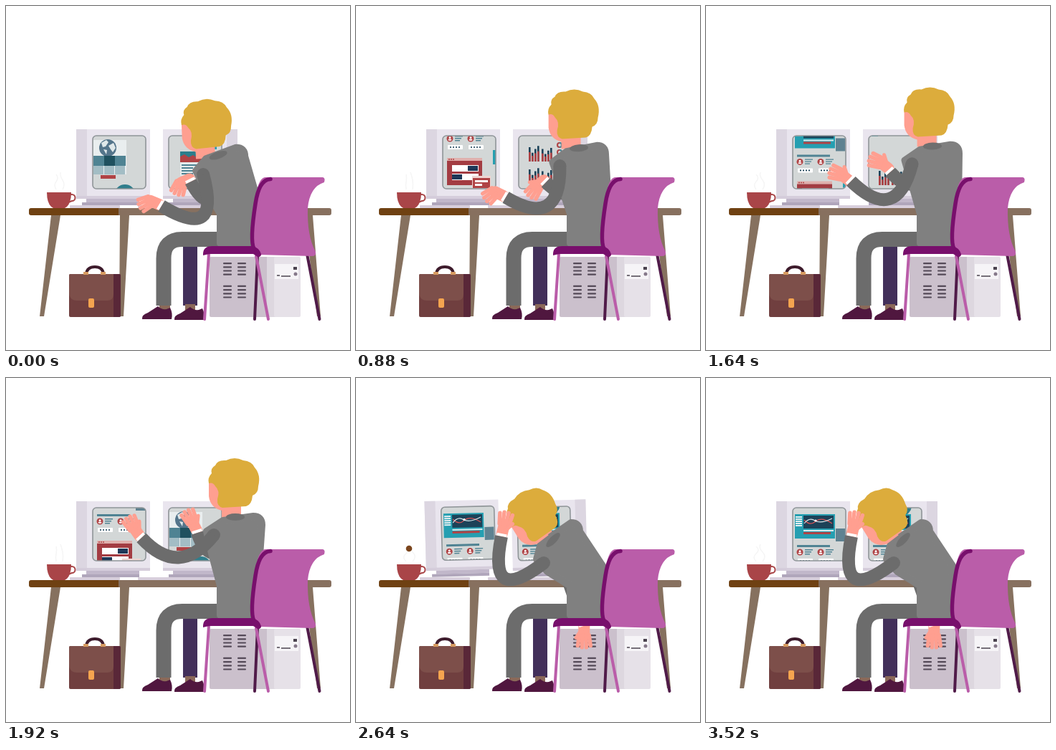
Recreate the animation shown at these times as an HTML page with a canvas. Size 480 by 480 pixels, loop 3560 ms.

```html
<!DOCTYPE html>
<html lang="en">
<head>
<meta charset="utf-8">
<title>Office worker</title>
<style>
html, body { margin: 0; width: 100%; height: 100%; overflow: hidden; background: #fff }
canvas { display: block; width: 480px; height: 480px }
</style>
</head>
<body>
<canvas id="stage" width="480" height="480"></canvas>
<script>
const g = document.getElementById('stage').getContext('2d');
const LOOP = 3560, STEP = 40, BEAT = 480, SLAM = 2160;
const GREY = '#808080', SLEEVE = '#6c6c6c', SKIN = '#ff9f90', HAIR = '#dcac3c';
const PINK = '#ba5da9', PLUM = '#780f6c', SHOE = '#50173f';
const RED = '#b04345', TEAL = '#259fb1', NAVY = '#1c4258', SLATE = '#4f8393';
const { PI, sin, cos, abs, max, min, floor, hypot, sqrt } = Math;

// Drawing helpers
function box(color, x, y, w, h, r = 0) {
  g.fillStyle = color;
  g.beginPath();
  g.roundRect(x, y, w, h, r);
  g.fill();
}
function dot(color, x, y, r) {
  g.fillStyle = color;
  g.beginPath();
  g.arc(x, y, r, 0, 2 * PI);
  g.fill();
}
function fill(color, path) {
  g.fillStyle = color;
  g.fill(new Path2D(path));
}
function line(color, width, path, cap = 'butt') {
  g.strokeStyle = color;
  g.lineWidth = width;
  g.lineCap = cap;
  g.lineJoin = 'round';
  g.stroke(new Path2D(path));
}
function group(draw, x = 0, y = 0, angle = 0) {
  g.save();
  g.translate(x, y);
  g.rotate(angle);
  draw();
  g.restore();
}
function repeat(n, draw) {
  for (let i = 0; i < n; i++) draw(i);
}

// One stop per beat: each is held, then eases into the next; the last one stays
function atBeat(stops, t) {
  const last = stops.length - 1, beat = min(last, t / BEAT + .1), i = floor(beat);
  const u = max(0, min(1, (beat - i - .27) / .46)), e = u * u * (3 - 2 * u);
  const mix = (a, b) => a + (b - a) * e;
  const from = stops[i], to = stops[min(last, i + 1)];
  return Array.isArray(from) ? from.map((v, n) => mix(v, to[n])) : mix(from, to);
}

// A pose is how far the body leans, then wrist x y, hand angle and finger bend per arm
const leaning = [.53, 217, 279, 3.54, -.85, 258, 245, 2.74, -.8];
const upright = [.2, 209, 267, 3.6, -1.15, 265, 246, 2.4, -.2];
const typing = [.2, 219, 271, 3.4, -.83, 245, 251, 3.29, -.76];
const raised = [0, 189, 223, 4.1, .09, 267, 216, 4.23, 0];
const despair = [1, 203, 221, 4.95, -.05, 317, 342, 1.57, 0];
const poses = [leaning, leaning, upright, typing, raised, despair];

// Screen sections, drawn in page coordinates
function person(x, y) {
  dot(RED, x, y, 4.5);
  dot('#fff', x, y - 1.2, 1.5);
  box('#fff', x - 2.3, y + .8, 4.6, 2, 1);
  repeat(3, i => box(SLATE, x + 7, y - 4 + i * 3, 11 - i * 2, 1.4));
}
function pill(x, y) {
  box('#fff', x, y, 21, 6, 1);
  repeat(4, i => dot(NAVY, x + 4 + i * 4, y + 3, 1.1));
}
function bars(x, y, n, height) {
  repeat(n, i => {
    const h = height * (.45 + .5 * abs(sin(i * 2.3 + 1)));
    box(NAVY, x + i * 4, y - h, 2.6, h);
    box(RED, x + i * 4, y - h * .65, 2.6, h * .65);
  });
}
function ring(x, y) {
  dot(RED, x, y, 4);
  fill(SLATE, `M${x} ${y}v-4a4 4 0 0 1 0 8z`);
  dot('#d3d7d7', x, y, 2);
  repeat(3, i => box(SLATE, x + 7, y - 3 + i * 3, 12, 1.2));
}
function globePage() {
  box('#e9eeef', 1, 6, 46, 48);
  dot('#54758b', 21, 17, 12);
  fill('#dfe8ea', 'M12 10l7-4 3 3-4 6-4 1zM22 14l7-4 3 7-4 6-3-4zM15 19l5 1-1 6z');
  repeat(3, i => {
    box(i == 1 ? '#1f515f' : SLATE, 1 + i * 15, 28, 15, 14);
    box('#a3bdc5', 1 + i * 15, 42, 14, 12);
  });
  box(RED, 11, 55, 21, 5);
  dot('#2f7d8b', 45, 83, 15);
}
function dashboard() {
  fill('#236371', 'M0 0h13q-1 15-13 22z');
  box('#4f7084', 18, 0, 48, 2.5);
  box(RED, 18, 4, 34, 3);
  for (const x of [18, 46]) {
    person(x + 4, 15);
    pill(x, 23);
    pill(x, 33);
    box(RED, x, 41, 21, 5);
  }
  bars(3, 72, 9, 22);
  repeat(3, i => ring(48, 50 + i * 10));
}
function formPage() {
  box(TEAL, 3, 0, 56, 34);
  box(NAVY, 15, 2, 42, 18);
  repeat(5, i => box('#e4eff1', 4, 3 + i * 3, 9, 2));
  line('#d65356', 1.2, 'M16 8q8 9 16 2t23 3');
  line('#d8e5e9', 1.2, 'M16 13q7-9 15-4t24-3');
  dot('#fff', 32, 9, 1.6);
  box('#d7edf0', 15, 22, 42, 2);
  box(RED, 15, 25, 38, 3);
  box('#5f8291', 60, 20, 13, 18);
  box(SLATE, 6, 43, 46, 3);
  for (const x of [4, 33]) {
    person(x + 6, 53);
    pill(x + 3, 62);
  }
  box(TEAL, 70, 69, 4, 20);
  box('#dfb0ad', 6, 80, 49, 4);
  repeat(3, i => dot(RED, 9 + i * 3, 82, 1));
  box('#a33c42', 6, 84, 49, 34);
  repeat(2, i => {
    box('#fff', 13, 90 + i * 12, 37, 9);
    box('#1d3858', 35 - i * 22, 91 + i * 12, 14, 7);
  });
  box('#efd5d2', 41, 105, 26, 17);
  box(RED, 42, 108, 24, 14);
  repeat(2, i => box('#fff', 45, 111 + i * 5, 18 - i * 8, 3));
}
function areaPage() {
  box('#2b7d8b', 16, 22, 30, 15);
  fill(RED, 'M16 37v-8l6-3 6 4 6-3 6 4 6-4v10z');
  box('#e4eaeb', 16, 37, 30, 19);
  repeat(4, i => box(SLATE, 18, 40 + i * 4, i % 2 ? 16 : 26, 2));
  box(TEAL, 37, 2, 30, 17);
  box(NAVY, 43, 4, 22, 9);
}
function cardPage() {
  box(TEAL, 0, 35, 13, 23);
  box('#e3f0f2', 2, 38, 9, 4);
  box(NAVY, 2, 45, 9, 8);
  repeat(4, i => box(RED, 30, 22 + i * 9, 36, 3));
}
function chartPage() {
  for (const y of [36, 67]) {
    bars(14, y, 4, 23);
    bars(32, y, 4, 20);
    repeat(2, i => ring(57, y - 23 + i * 10));
  }
}
const pages = {
  left: { sections: [[0, globePage], [90, dashboard], [185, formPage]], stops: [0, 90, 234, 180, 219, 176] },
  right: {
    sections: [[0, areaPage], [90, cardPage], [180, chartPage], [265, globePage], [360, formPage]],
    stops: [0, 90, 180, 0, 265, 351]
  }
};

function screen(x, { sections, stops }, t) {
  const scroll = atBeat(stops, t);
  const frame = new Path2D();
  frame.roundRect(x, 181, 74, 74, 5);
  g.save();
  g.clip(frame);
  box('#d3d7d7', x, 181, 74, 74);
  for (const [top, draw] of sections) group(draw, x, 181 + top - scroll);
  g.restore();
  g.strokeStyle = '#8f9598';
  g.lineWidth = 1.6;
  g.stroke(frame);
}
function monitor(x, page, shadeX, screenX, t, tilt) {
  group(() => {
    box('#c1b7ca', 14, -4, 74, 6);
    box('#b0a6bb', 8, 2, 80, 4);
    box('#e9e5ee', 0, -100, 103, 97);
    box('#dcd6e1', shadeX, -100, 15, 97);
    box('#d5cddb', 0, -7, 103, 4);
    group(() => screen(0, page, t), screenX, -272);
  }, x, 272, tilt);
}

function desk() {
  fill('#86715f', 'M63 292h13L53 433h-6zM159 292h13L164 433h-6zM416 292h12L439 433h-5z');
  box('#87705f', 150, 282, 304, 10, 3);
  box('#6f4112', 32, 282, 125, 10, [3, 0, 0, 3]);
  box('#d8cfdc', 89, 278, 70, 4, 1);
  box('#d8cfdc', 184, 278, 110, 4, 1);
}
function cup(t) {
  const s = 3 * sin(t / 180);
  line('#f5f5f5', 1.5, `M70 256q${-4 - s} -6 0-11t0-10M79 256q${4 + s} -7 0-13t-3-11`);
  const u = (t - SLAM) / 640;
  if (u > 0 && u < 1) dot('#7b451d', 74, 262 - 128 * u * (1 - u), 4.3);
  line('#a94548', 2, 'M89 263h3a4 4 0 0 1 0 9l-5 2');
  fill('#a94548', 'M57 260h34q0 14-6 20l-3 2H66l-3-2q-6-6-6-20z');
}
function briefcase() {
  line('#3d1b2c', 4, 'M112 374q1-10 12-10t12 10');
  box('#703f3f', 88, 374, 72, 60, 2);
  box('#592738', 150, 374, 10, 60, [0, 2, 2, 0]);
  fill('#7d4f4a', 'M88 376q0-2 2-2h60v28q0 9-9 9H99q-11 0-11-12z');
  for (const x of [108, 132]) box('#d69a61', x, 371, 7, 4);
  box('#f5a44f', 115, 408, 8, 13, 2);
}
function computer() {
  box('#cbc0cc', 284, 350, 82, 84, 2);
  box('#ddd7df', 364, 350, 12, 84);
  box('#e6e1e8', 374, 350, 37, 84, 2);
  for (const x of [303, 323])
    repeat(8, i => box('#554a58', x, 358 + i * 5.2 + (i > 3 ? 11 : 0), 12, 2.2, 1));
  box('#f6f4f7', 375, 360, 33, 21);
  line('#4b434f', 1.6, 'M378 376h4M384 377h13');
  box('#4b434f', 401, 364, 5, 4);
  dot('#85788a', 404, 374, 2.5);
}
function legs() {
  box('#43305a', 247, 334, 20, 84);
  box('#8b6959', 214, 416, 15, 14);
  box('#8b6959', 250, 416, 14, 14);
  line(SLEEVE, 21, 'M300 325.500H246Q220 325.500 220 352V418');
  const shoe = 'M190 437q-1-6 8-9l14-9q5 5 12 4l5-2q4 8 2 16z';
  fill(SHOE, shoe);
  group(() => fill(SHOE, shoe), 45, 1);
}
function chair() {
  line('#501b49', 4, 'M351 349L347 437M420 346L437.500 437', 'round');
  line(PINK, 4, 'M283 346L277 437M349 349L366 437', 'round');
  fill(PINK, 'M362 239H442Q446 240 444 246Q424 252 421 282Q420 321 432 343Q433 349 427 349L352 347Q341 338 345 300Q348 239 362 239z');
  line(PLUM, 5.5, 'M369 241.500Q353 242 348 276Q340 327 346 339L353 347', 'round');
  fill(PLUM, 'M275 348Q274 335 288 335H344Q353 337 356 346Q356 350 351 350L345 346H284Q278 347 275 348z');
}

// Figure
function hand(x, y, a, bend) {
  const kx = x + 13 * cos(a), ky = y + 13 * sin(a), f = a + bend;
  line(SKIN, 16, `M${x} ${y}L${kx} ${ky}`, 'round');
  repeat(4, i => {
    const k = i - 1.5, d = f + k * .09, n = 18 - 2 * abs(k);
    line(SKIN, 5.4, `M${kx - 4.6 * k * sin(f)} ${ky + 4.6 * k * cos(f)}l${n * cos(d)} ${n * sin(d)}`, 'round');
  });
  const thumb = a + .6;
  if (abs(bend) < .5) line(SKIN, 5, `M${x} ${y}l${20 * cos(thumb)} ${20 * sin(thumb)}`, 'round');
}
// The elbow hangs off the shoulder-wrist line, further out the closer the wrist is
function arm(sx, sy, reach, [wx, wy, a, bend], bob) {
  const dx = wx - sx, dy = wy - sy, d = hypot(dx, dy);
  const h = sqrt(max(0, reach * reach - d * d)) / d;
  const ex = (sx + wx) / 2 + dy * h, ey = (sy + wy) / 2 - dx * h;
  const n = hypot(wx - ex, wy - ey) / 4, ux = (wx - ex) / n, uy = (wy - ey) / n;
  hand(wx + ux, wy + uy + bob, a, bend);
  line('#fff', 14, `M${wx} ${wy}l${ux} ${uy}`);
  dot(SLEEVE, sx, sy, 9);
  line(SLEEVE, 18, `M${sx} ${sy}Q${ex} ${ey} ${wx} ${wy}`);
}
function head() {
  fill(SKIN, 'M-36 0L-36 20Q-34 36-18 40L2 38V0z');
  fill(HAIR, 'M-36 2Q-38-6-32-12Q-34-19-27-23Q-24-31-12-30Q0-36 12-30Q24-29 28-20Q37-10 33 6Q33 16 25 19Q24 32 16 34L-17 36Q-25 34-24 24Q-20 12-27 6Q-30 0-36 2z');
}
function figure(t) {
  const [lean, ...arms] = atBeat(poses, t);
  const drop = lean ** 1.4;
  const typingBob = t < SLAM ? 1.8 * sin(2 * PI * t / 160) : 0;
  const sob = t > 2240 ? 1 - cos(2 * PI * (t - 2640) / 440) : 0;
  const chest = [278 - 28 * lean, 211 + 39 * drop];
  const shoulder = [357 - 45 * lean, 193 + 9 * lean];
  const collar = [shoulder[0] - 37, shoulder[1] + 1 + 23 * drop];
  const headAt = [319 - 72 * lean, 145 + 43 * drop + sob, -.55 * lean ** 4];

  arm(chest[0] + 40, chest[1] + 15, 70, arms.slice(4), -typingBob);
  legs();
  group(() => box(SKIN, -18, 28, 27, 22), ...headAt);

  const outline = `M${collar[0] - 17} ${collar[1] + 5}L${shoulder[0] - 12} ${shoulder[1]}`
    + `Q${shoulder[0]} ${shoulder[1]} ${shoulder[0]} ${shoulder[1] + 12}`
    + `L${353 - 9 * lean} 262L342 331H299V290L${287 - 20 * drop} ${245 + 25 * drop}L${chest[0] + 2} ${chest[1] + 3}z`;
  fill(GREY, outline);
  line(GREY, 10, outline);
  group(() => {
    g.fillStyle = '#6f6f6f';
    g.beginPath();
    g.ellipse(0, 0, 13, 5, 0, 0, 2 * PI);
    g.fill();
  }, ...collar, -.8 * drop);

  group(head, ...headAt);
  arm(chest[0] + 12, chest[1] + 8, 117, arms.slice(0, 4), typingBob);
}

function draw(t) {
  const dt = t - SLAM, shaking = dt > 0 && dt < 720;
  const tilt = shaking ? -.077 * (1 - dt / 720) * sin(2 * PI * dt / 384) : 0;
  const jolt = shaking ? 2 * max(0, 1 - dt / 400) * sin(2 * PI * dt / 160) : 0;
  g.fillStyle = '#fff';
  g.fillRect(0, 0, 480, 480);
  group(() => {
    desk();
    monitor(98, pages.left, 0, 23, t, tilt);
    monitor(219, pages.right, 89, 8, t, tilt);
    cup(t);
  }, 0, jolt);
  briefcase();
  computer();
  figure(t);
  chair();
}
function tick() {
  const t = performance.now() % LOOP;
  draw(min(LOOP - STEP, floor(t / STEP) * STEP));
  requestAnimationFrame(tick);
}
tick();
</script>
</body>
</html>
```
